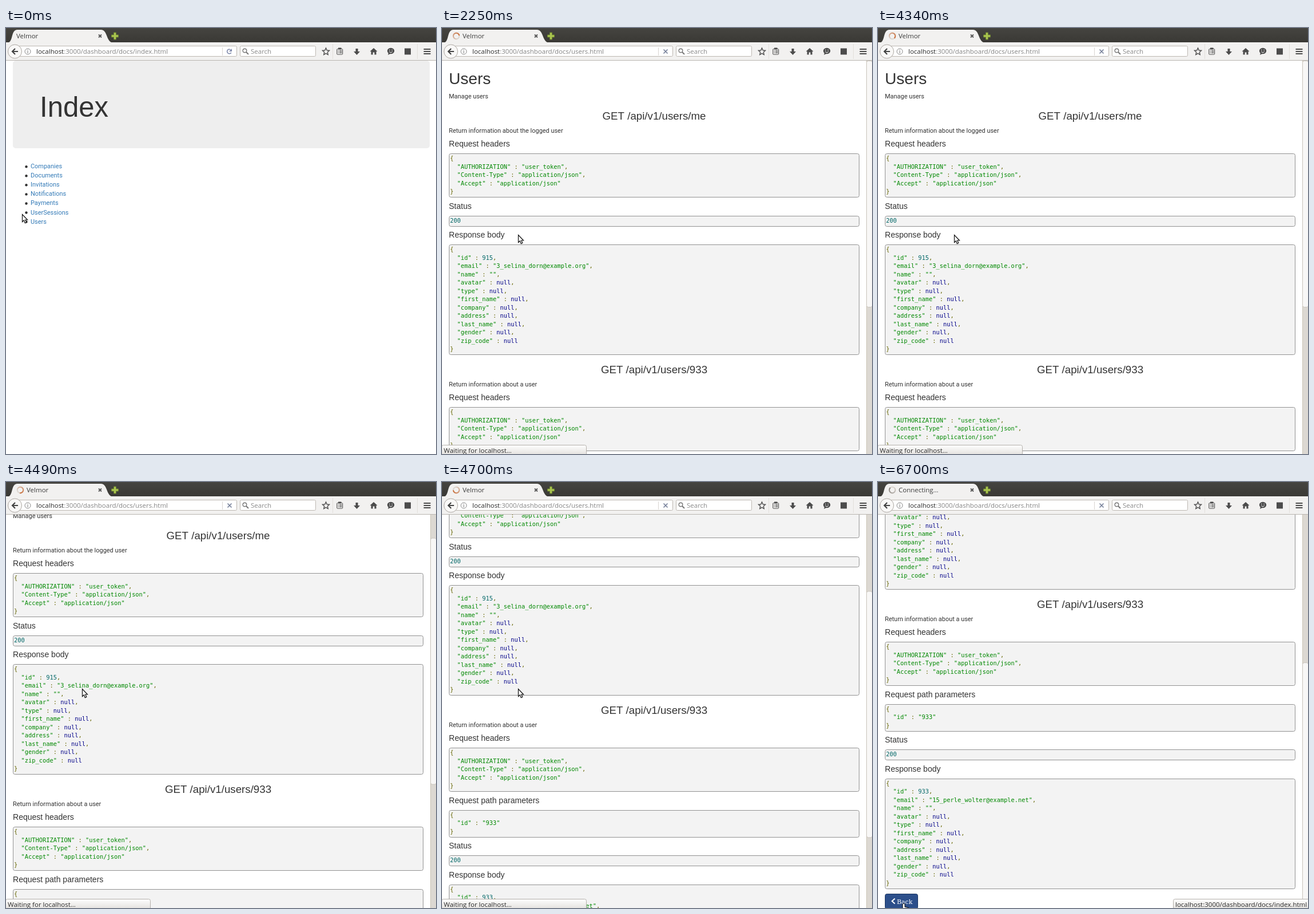
Recreate the animation shown at these times as an HTML page with a canvas. Size 752 by 744 pixels, loop 6.74 s.

```html
<!DOCTYPE html>
<html lang="en">
<head>
<meta charset="utf-8">
<title>API docs</title>
<style>
html, body { margin: 0; width: 100%; height: 100%; overflow: hidden; background: #fff; }
canvas { display: block; width: 752px; height: 744px; }
</style>
</head>
<body>
<canvas id="stage"></canvas>
<script>
const W = 752, H = 744, LOOP = 6740, TOP = 57, END = 383;
const canvas = document.getElementById('stage');
const c = canvas.getContext('2d');
const ratio = window.devicePixelRatio || 1;
canvas.width = W * ratio;
canvas.height = H * ratio;

const UI = '11.5px "Open Sans", "Noto Sans", sans-serif';
const BODY = '10.95px Roboto, sans-serif';
const MONO = '10.38px "DejaVu Sans Mono", monospace';
const head = size => size + 'px "Liberation Sans", Arial, sans-serif';

const NAME = 'Velmor';
const HOST = 'localhost';
const pathTo = page => ':3000/dashboard/docs/' + page + '.html';
const LINKS = ['Companies', 'Documents', 'Invitations', 'Notifications', 'Payments', 'UserSessions', 'Users'];

// time, x, y, eased
const MOVES = [
  [50, 28, 325], [380, 57, 336, 1], [770, 57, 336], [1170, 82, 349],
  [1470, 106, 356], [1870, 133, 361], [5830, 133, 361], [6450, 45, 736, 1]
];
const SCROLL = [[4360, 0], [4440, 28], [4600, 129], [4700, 198], [5449, 198], [5450, END]];
const SPIN = [[770, 0], [1870, 1100], [2150, 1100], [2860, 1810], [3800, 1810], [4700, 2710], [6550, 2710], [6740, 2900]];

const HEADERS = ['{', '  "AUTHORIZATION" : "user_token",', '  "Content-Type" : "application/json",', '  "Accept" : "application/json"', '}'];
const EMPTY = ['avatar', 'type', 'first_name', 'company', 'address', 'last_name', 'gender', 'zip_code'];

function userBody(id, email) {
  const fields = EMPTY.map((key, i) => `  "${key}" : null` + (i < EMPTY.length - 1 ? ',' : ''));
  return ['{', `  "id" : ${id},`, `  "email" : "${email}",`, '  "name" : "",', ...fields, '}'];
}

const SECTIONS = [
  { y: 160, title: 'GET /api/v1/users/me', about: 'Return information about the logged user',
    blocks: [['Request headers', HEADERS], ['Status', ['200']],
      ['Response body', userBody(915, '3_selina_dorn@example.org')]] },
  { y: 603, title: 'GET /api/v1/users/933', about: 'Return information about a user',
    blocks: [['Request headers', HEADERS], ['Request path parameters', ['{', '  "id" : "933"', '}']],
      ['Status', ['200']], ['Response body', userBody(933, '15_perle_wolter@example.net')]] }
];

function track(keys, t, k = 1) {
  if (t <= keys[0][0]) return keys[0][k];
  for (let i = 1; i < keys.length; i++) {
    const a = keys[i - 1], b = keys[i];
    if (t < b[0]) {
      let u = (t - a[0]) / (b[0] - a[0]);
      if (b[3]) u = u * u * (3 - 2 * u);
      return a[k] + (b[k] - a[k]) * u;
    }
  }
  return keys[keys.length - 1][k];
}

function text(s, x, y, font, color, align = 'left') {
  c.font = font;
  c.fillStyle = color;
  c.textAlign = align;
  c.fillText(s, x, y);
  return c.measureText(s).width;
}

function rect(x, y, w, h, color) {
  c.fillStyle = color;
  c.fillRect(x, y, w, h);
}

function box(x, y, w, h, r, fill, border) {
  c.beginPath();
  c.roundRect(x, y, w, h, r);
  paint(fill, border);
}

function disc(x, y, r, fill, border, width) {
  c.beginPath();
  c.arc(x, y, r, 0, Math.PI * 2);
  paint(fill, border, width);
}

function shape(d, x, y, fill, border, width) {
  c.save();
  c.translate(x, y);
  const p = new Path2D(d);
  if (fill) { c.fillStyle = fill; c.fill(p); }
  if (border) { c.strokeStyle = border; c.lineWidth = width || 1; c.stroke(p); }
  c.restore();
}

function paint(fill, border, width = 1) {
  if (fill) { c.fillStyle = fill; c.fill(); }
  if (border) { c.strokeStyle = border; c.lineWidth = width; c.stroke(); }
}

function fade(y0, y1, a, b) {
  const g = c.createLinearGradient(0, y0, 0, y1);
  g.addColorStop(0, a);
  g.addColorStop(1, b);
  return g;
}

function tokenColor(s) {
  if (s[0] === '"') return '#080';
  if (s === 'null') return '#008';
  return /\d/.test(s) ? '#066' : '#660';
}

function codeLine(line, x, y) {
  c.font = MONO;
  const step = c.measureText('0').width;
  for (const m of line.matchAll(/"[^"]*"|\w+|[^\s\w"]+/g))
    text(m[0], x + m.index * step, y, MONO, tokenColor(m[0]));
}

function codeBox(lines, y) {
  const h = lines.length * 14.5 + 4.5;
  const top = Math.round(y) + 0.5;
  box(12.5, top, 717, Math.round(y + h) - top - 0.5, 3, '#f3f3f3', '#929292');
  lines.forEach((line, i) => codeLine(line, 14, y + 12.4 + i * 14.5));
  return y + h;
}

function section(s) {
  text(s.title, 371, s.y, head(18.72), '#333', 'center');
  text(s.about, 12, s.y + 23.3, BODY, '#333');
  let y = s.y + 59;
  for (const [label, lines] of s.blocks) {
    text(label, 12, y - 11.6, head(14.04), '#333');
    y = codeBox(lines, y) + 31.5;
  }
}

function indexPage(hover, pressed) {
  box(12, TOP, 729, 153, 5, '#eee');
  text('Index', 59, 155, head(49.1), '#333');
  LINKS.forEach((label, i) => {
    const y = 245.2 + i * 16.06, hot = hover && label === 'Users';
    const color = pressed && hot ? '#1b3f60' : hot ? '#23527c' : '#337ab7';
    disc(35.5, y - 3, 2.2, '#333');
    const w = text(label, 43, y, BODY, color);
    if (hot) rect(43, Math.round(y) + 1, w, 1, color);
  });
}

function usersPage(scroll, hover, pressed) {
  c.save();
  c.translate(0, -Math.round(scroll));
  text('Users', 12, 98, head(28.08), '#333');
  text('Manage users', 12, 122.8, BODY, '#333');
  SECTIONS.forEach(section);
  box(12.5, 1102.5, 57, 26, 3, pressed ? '#2c4f8b' : hover ? '#286090' : '#337ab7', pressed ? '#1d3763' : '#2e6da4');
  shape('M6 0L1 4.5L6 9', 23.5, 1110.5, null, '#fff', 2);
  text('Back', 33, 1120, '10.95px "DejaVu Serif", "Noto Serif", serif', '#fff');
  c.restore();
  rect(742, TOP, 10, H - TOP, '#dcd8d2');
  rect(742, TOP, 1, H - TOP, '#cdc6b8');
  box(742.5, TOP + 0.5 + scroll * 0.674, 10, 430, 3, '#f8f7f6', '#c9c4bc');
}

function panel(x, w, draw) {
  box(x + 0.5, 728.5, w - 1, 20, 3, fade(728, 744, '#fff', '#e6e4e1'), '#b4b0ab');
  draw();
}

function address(x, y, page, color) {
  const w = text(HOST, x, y, UI, '#2b2b2b');
  text(pathTo(page), x + w, y, UI, color);
}

function spinner(t, grey) {
  const turn = track(SPIN, t) / 1000 * Math.PI * 2;
  const rgb = grey ? '130,126,122' : '200,98,40';
  disc(25, 14, 5.2, null, '#dcd6d0', 2);
  c.lineWidth = 2;
  const n = 16, da = Math.PI * 1.55 / n;
  for (let i = 0; i < n; i++) {
    c.strokeStyle = `rgba(${rgb},${(i + 1) / n})`;
    c.beginPath();
    c.arc(25, 14, 5.2, turn + i * da, turn + (i + 1) * da);
    c.stroke();
  }
}

function icons() {
  const ink = '#4c4c4c';
  shape('M0 -6L1.8 -2L6 -1.6L2.8 1.3L3.7 5.6L0 3.4L-3.7 5.6L-2.8 1.3L-6 -1.6L-1.8 -2Z', 559.5, 41, null, ink, 1.4);
  rect(571, 28, 1, 26, '#e2dfdb');
  box(578.7, 36.7, 10, 9.5, 1, null, ink);
  rect(581, 34.5, 5.5, 3, ink);
  for (const y of [39, 41, 43]) {
    rect(580.5, y, 1.3, 1, ink);
    rect(583, y, 4.5, 1, ink);
  }
  shape('M-2 -5H2V0H5.5L0 6L-5.5 0H-2Z', 613.5, 41, ink);
  shape('M0 -6L6.5 0H4.5V5.5H1.4V1.5H-1.4V5.5H-4.5V0H-6.5Z', 643, 41, ink);
  shape('M-4 3L-5 7L0 4.5Z', 673, 40, ink);
  c.beginPath();
  c.ellipse(673, 40, 6.2, 5.2, 0, 0, Math.PI * 2);
  paint(ink);
  disc(670.8, 38.5, 0.8, '#fff');
  disc(675.2, 38.5, 0.8, '#fff');
  shape('M-3 0Q0 3.5 3 0', 673, 41, null, '#fff', 1);
  box(697, 35.5, 11, 11, 0, ink);
  rect(719, 28, 1, 26, '#e2dfdb');
  for (const y of [36, 40, 44]) rect(730.5, y, 12, 2, ink);
}

function chrome(t) {
  const loading = t >= 770 && t < 5450 || t >= 6550;
  const connecting = t >= 770 && t < 2150 || t >= 6550;
  rect(0, 0, W, 26, fade(0, 25, '#454440', '#3a3935'));
  rect(0, 25, W, 31, '#f2f1f0');
  rect(0, 56, W, 1, '#b9b5b0');
  shape('M3 25.5C13 25 8 3 20 3H166C178 3 175 25 187 25.5Z', 0, 0, '#f2f1f0');
  if (loading) spinner(t, t < 1000 || t >= 6550);
  text(connecting ? 'Connecting…' : NAME, loading ? 36 : 18, 18, UI, '#3c3c3c');
  shape('M-2.5 -2.5L2.5 2.5M2.5 -2.5L-2.5 2.5', 164.5, 14, null, '#555', 1.8);
  shape('M-2 -6H2V-2H6V2H2V6H-2V2H-6V-2H-2Z', 190.5, 14, '#a9c34f', '#6d8430');

  box(20.5, 31.5, 383, 18, 2, '#fff', '#bdb8b2');
  disc(15.5, 41, 12, '#f9f8f7', '#aaa5a0');
  shape('M0.5 -5L-4.5 0L0.5 5M-4 0H5.5', 15.5, 41, null, '#444', 2.2);
  disc(38, 41, 5, null, '#8a8a8a');
  rect(37.5, 40, 1.2, 4, '#8a8a8a');
  rect(37.5, 38, 1.2, 1.2, '#8a8a8a');
  address(53, 45, t < 770 ? 'index' : 'users', '#858585');
  rect(378, 34, 1, 14, '#d8d5d1');
  if (loading) {
    shape('M-3.5 -3.5L3.5 3.5M3.5 -3.5L-3.5 3.5', 391, 41, null, '#77819a', 1.7);
  } else {
    c.beginPath();
    c.arc(390.5, 41, 3.8, 0.5, 5.3);
    paint(null, '#7f89ab', 1.6);
    shape('M4.5 -5V0H-0.5Z', 390.5, 41, '#7f89ab');
  }
  box(409.5, 31.5, 132, 18, 2, '#fff', '#bdb8b2');
  disc(417.5, 39.5, 3.3, null, '#777', 1.4);
  shape('M0 0L4 4', 420, 42, null, '#777', 2);
  text('Search', 428, 45, UI, '#8b8b8b');
  icons();
}

function pointer(x, y, hand) {
  if (hand) shape('M-2 1.5Q0 -1.5 2 1.5V6L8 7.5Q10 8 10 10L8.5 16H0L-5 10.5Q-5 7.5 -2 9Z', x, y, '#fff', '#111', 1.1);
  else shape('M0.5 0.5V13.5L3.4 10.8L5.3 15.6L7.8 14.5L5.8 10H9.5Z', x, y, '#fff', '#111', 1.2);
}

function draw(t) {
  c.setTransform(ratio, 0, 0, ratio, 0, 0);
  rect(0, 0, W, H, '#fff');
  const x = track(MOVES, t), y = track(MOVES, t, 2);
  const scroll = track(SCROLL, t);
  const onIndex = t < 2150;
  const onLink = onIndex && x > 43 && x < 71 && y > 330 && y < 346;
  const onBack = !onIndex && x > 12 && x < 70 && y > 719;

  if (onIndex) indexPage(onLink, t >= 610);
  else usersPage(scroll, onBack, t >= 6550);

  if (onLink) panel(-1, 237, () => text(HOST + pathTo('users'), 3, 741.5, UI, '#2b2b2b'));
  else if (t >= 770 && t < 5450) panel(-1, 254, () => text('Waiting for ' + HOST + '…', 3, 741.5, UI, '#2b2b2b'));
  if (onBack) panel(516, 240, () => text(HOST + pathTo('index'), 520, 741.5, UI, '#2b2b2b'));

  chrome(t);
  pointer(x, y, onLink || onBack);
}

const start = performance.now();
function tick() {
  draw((performance.now() - start) % LOOP);
  requestAnimationFrame(tick);
}
tick();
</script>
</body>
</html>
```
